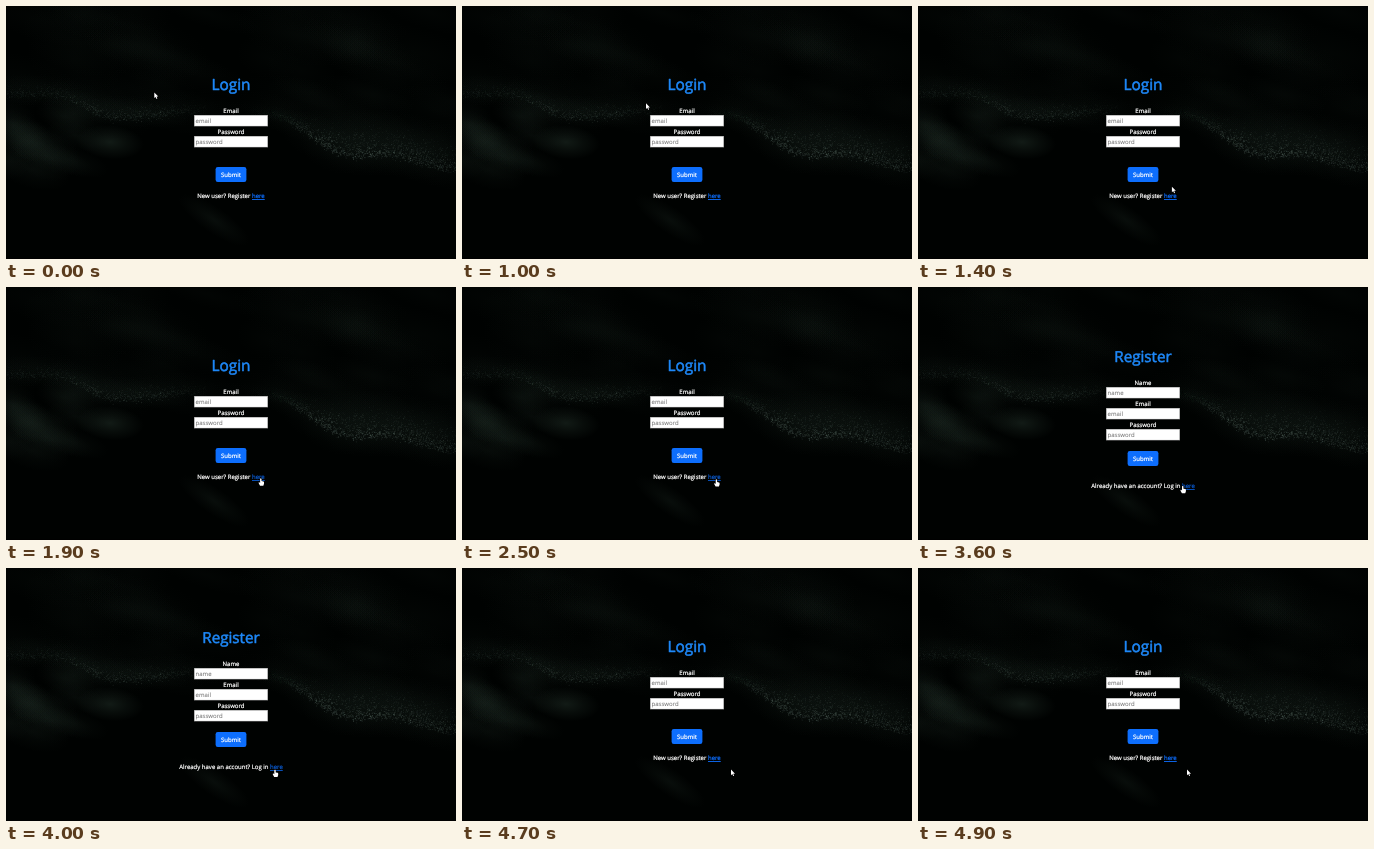
Recreate the animation shown at these times as an HTML page with a canvas. Size 450 by 253 pixels, loop 5 s.

```html
<!DOCTYPE html>
<html lang="en">
<head>
<meta charset="utf-8">
<title>Login and register</title>
<style>
html, body { margin: 0; width: 100%; height: 100%; overflow: hidden; background: #000; }
canvas { display: block; }
</style>
</head>
<body>
<canvas id="stage" width="450" height="253"></canvas>
<script>
const W = 450, H = 253, LOOP = 5000, STEP = 100, MID = W / 2;
const ROW = 21.1;
const FONT = '"Open Sans", "Noto Sans", sans-serif';
const ctx = document.getElementById('stage').getContext('2d');

const login = {
  title: 'Login', top: 84, size: 15.4, fields: ['Email', 'Password'],
  button: 161, note: 'New user? Register ', noteY: 192.3
};
const register = {
  title: 'Register', top: 75, size: 15.2, fields: ['Name', 'Email', 'Password'],
  button: 164, note: 'Already have an account? Log in ', noteY: 201.2
};

const home = { x: 148.3, y: 86.5 };
const moves = [
  { from: 300, to: 900, x: 184, y: 97.3 },
  { from: 1000, to: 1500, x: 257.5, y: 185 },
  { from: 1500, to: 2100, x: 254.4, y: 192.2 },
  { from: 3300, to: 3900, x: 269, y: 201.6 }
];

const clamp = u => Math.min(1, Math.max(0, u));
const rise = (x, a, b) => {
  const u = clamp((x - a) / (b - a));
  return u * u * (3 - 2 * u);
};

function seeded(seed) {
  return () => (seed = (seed * 16807) % 2147483647) / 2147483647;
}

function pointerAt(t) {
  let { x, y } = home;
  for (const m of moves) {
    const k = Math.sin(clamp((t - m.from) / (m.to - m.from)) * Math.PI / 2);
    x += (m.x - x) * k;
    y += (m.y - y) * k;
  }
  return { x, y };
}

const leftCrest = x => 90 + 23 * rise(x, 50, 110) - 7 * rise(x, 110, 200);
const rightCrest = x => 109 + 41 * rise(x, 262, 345) + 14 * rise(x, 380, 450);

function makeBackdrop() {
  const layer = document.createElement('canvas');
  layer.width = W;
  layer.height = H;
  const g = layer.getContext('2d');
  const rnd = seeded(4711);
  g.fillStyle = '#000201';
  g.fillRect(0, 0, W, H);

  function glow(x, y, rx, ry, tilt, alpha) {
    g.save();
    g.translate(x, y);
    g.rotate(tilt);
    g.scale(rx, ry);
    const fade = g.createRadialGradient(0, 0, 0, 0, 0, 1);
    fade.addColorStop(0, `rgba(66,92,78,${alpha})`);
    fade.addColorStop(0.5, `rgba(66,92,78,${alpha * 0.45})`);
    fade.addColorStop(1, 'rgba(66,92,78,0)');
    g.fillStyle = fade;
    g.fillRect(-1, -1, 2, 2);
    g.restore();
  }

  // Thin clouds over the upper part, smoke below the left crest
  for (let i = 0; i < 45; i++) {
    glow(rnd() * W, rnd() * 110, 30 + rnd() * 50, 12 + rnd() * 20, 0.3, 0.035);
  }
  for (let i = 0; i < 14; i++) {
    glow(rnd() * 75, 105 + rnd() * 60, 20 + rnd() * 25, 12 + rnd() * 14, 0.3, 0.09);
  }
  glow(104, 136, 34, 17, 0.1, 0.27);
  glow(208, 214, 42, 13, 0.6, 0.13);

  // Dust thins out upwards from a soft lower edge
  function dust(crest, x0, x1, spread, power, count) {
    for (let x = x0; x < x1; x += 18) {
      glow(x, crest(x) - spread(x) * 0.4, 42, spread(x), 0.2, power(x) * 0.22);
    }
    for (let i = 0; i < count; i++) {
      const x = x0 + rnd() * (x1 - x0);
      const d = rnd() * rnd();
      const soft = (rnd() + rnd() + rnd() - 1.5) * 4;
      const alpha = power(x) * (1 - d * 0.75) * (0.3 + 0.7 * rnd());
      g.fillStyle = `rgba(120,140,132,${alpha})`;
      g.fillRect(x, crest(x) - d * spread(x) + soft, 0.9, 0.9);
    }
  }
  dust(leftCrest, 0, 200, () => 15,
    x => 0.15 + 0.1 * rise(x, 60, 100) - 0.15 * rise(x, 140, 200), 1100);
  dust(rightCrest, 245, W, x => 8 + 26 * rise(x, 275, 345),
    x => 0.06 + 0.28 * rise(x, 260, 325) - 0.08 * rise(x, 360, W), 2100);

  g.fillStyle = '#000';
  g.fillRect(0, H - 1, W, 1);
  return layer;
}

function setFont(size) {
  ctx.font = `${size}px ${FONT}`;
}

// A hairline outline gives the small type its weight
function text(str, x, y, color, align = 'left', weight = 0.22) {
  ctx.fillStyle = ctx.strokeStyle = color;
  ctx.lineWidth = weight;
  ctx.textAlign = align;
  ctx.fillText(str, x, y);
  ctx.strokeText(str, x, y);
}

function drawField(label, y) {
  const top = Math.round(y + 2);
  text(label, MID, y, '#fff', 'center');
  ctx.fillStyle = '#9a9a9a';
  ctx.fillRect(188, top, 74, 11.4);
  ctx.fillStyle = '#fff';
  ctx.fillRect(188.7, top + 0.6, 72.6, 10.3);
  text(label.toLowerCase(), 189.6, top + 8.2, '#757575', 'left', 0.05);
}

function drawPage(page, pointer) {
  setFont(page.size);
  text(page.title, MID, page.top, '#1e88f8', 'center', 0.55);
  setFont(6);
  page.fields.forEach((label, i) => drawField(label, page.top + 23.2 + i * ROW));

  ctx.fillStyle = '#0d6efd';
  ctx.beginPath();
  ctx.roundRect(209.6, page.button, 30.8, 15, 2.2);
  ctx.fill();
  text('Submit', MID, page.button + 9.8, '#fff', 'center');

  const noteW = ctx.measureText(page.note).width;
  const linkW = ctx.measureText('here').width;
  const left = MID - (noteW + linkW) / 2;
  const linkX = left + noteW;
  const over = pointer.x >= linkX && pointer.x <= linkX + linkW &&
    pointer.y >= page.noteY - 6.5 && pointer.y <= page.noteY + 2;
  text(page.note, left, page.noteY, '#fff');
  text('here', linkX, page.noteY, over ? '#0a58ca' : '#0d6efd');
  ctx.fillRect(linkX, Math.round(page.noteY + 0.6), linkW, 0.9);
  return over;
}

const arrow = new Path2D('M0 0V5.6L1.3 4.4L2.2 6.5L3.1 6.1L2.2 4.1H4Z');
const hand = new Path2D('M-.7 .5Q0-.4 .7 .5V2.8L2.6 3.2Q3.2 3.4 3.2 4.1V5.4L2.5 7.4H-.8' +
  'L-2.2 4.8Q-2.4 3.8-1.5 4L-.7 4.7Z');

function drawPointer({ x, y }, shape) {
  ctx.save();
  ctx.translate(x, y);
  ctx.strokeStyle = '#000';
  ctx.lineWidth = 0.9;
  ctx.stroke(shape);
  ctx.fillStyle = '#fff';
  ctx.fill(shape);
  ctx.restore();
}

const backdrop = makeBackdrop();
ctx.textRendering = 'geometricPrecision';
ctx.lineJoin = 'round';

function draw(now) {
  const t = Math.floor((now % LOOP) / STEP) * STEP;
  const pointer = pointerAt(t);
  ctx.drawImage(backdrop, 0, 0);
  const over = drawPage(t >= 2700 && t < 4700 ? register : login, pointer);
  drawPointer(pointer, over ? hand : arrow);
}

const start = performance.now();
function tick() {
  draw(performance.now() - start);
  requestAnimationFrame(tick);
}
tick();
</script>
</body>
</html>
```
